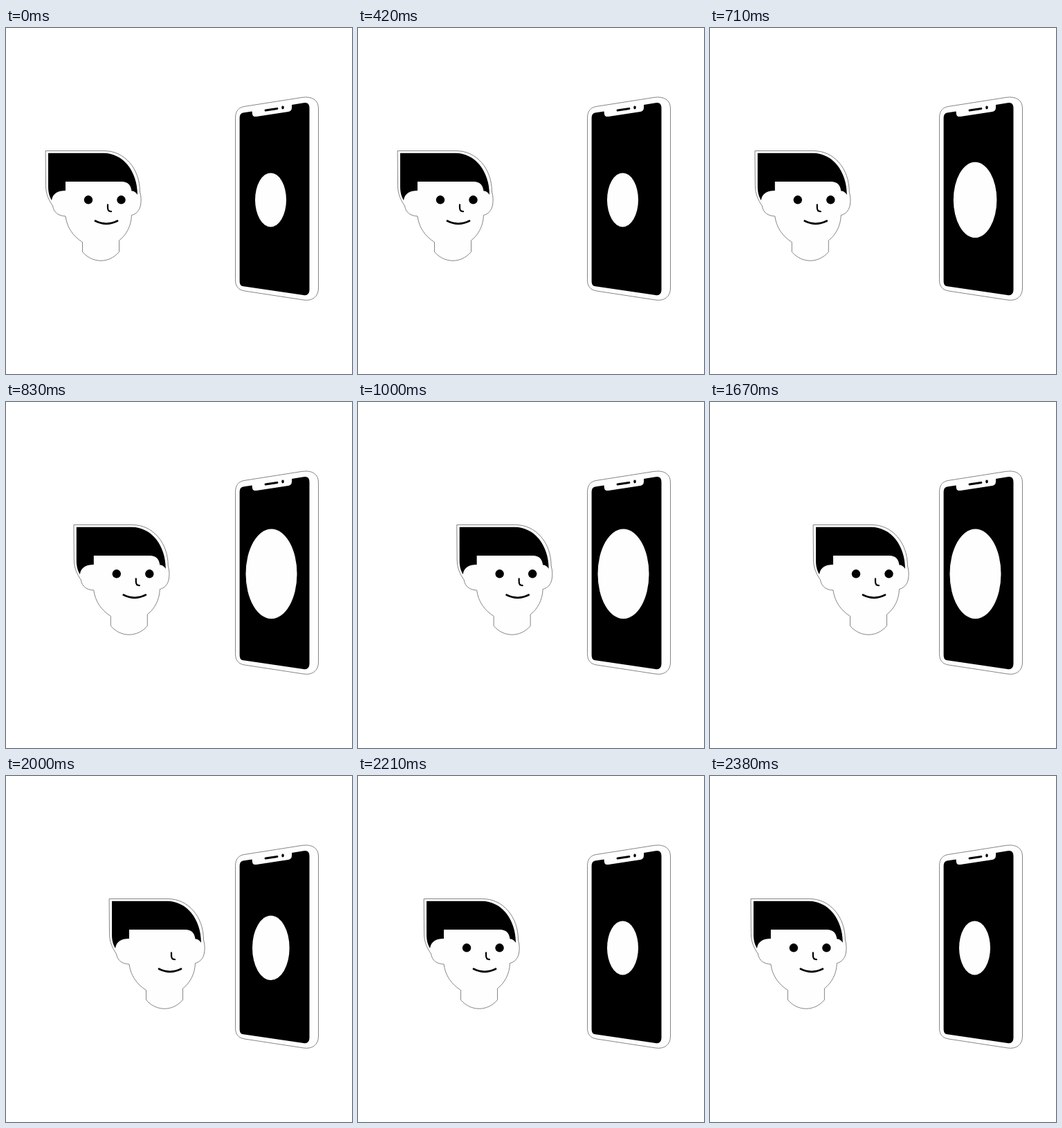
These frames come from a looping animation (500 px wide and 500 px high, 2.43 s). An HTML page with a canvas:

```html
<!DOCTYPE html>
<html lang="en">
<head>
<meta charset="utf-8">
<title>Face scan</title>
<style>
html, body { margin: 0; width: 100%; height: 100%; overflow: hidden; background: #fff; }
canvas { display: block; width: 100vmin; height: 100vmin; }
</style>
</head>
<body>
<canvas id="stage" width="500" height="500"></canvas>
<script>
const ctx = document.getElementById('stage').getContext('2d');
const LOOP = 2430, FPS = 24;
const INK = '#000', EDGE = '#666', PAPER = '#fefefe';

const phoneBody = new Path2D(
  'M331.5 130C331.5 120 336 115 344 113.5L428 100.3C442 98.3 451.5 104 451.5 116' +
  'V376C451.5 388 443 395 430 393L345 380C336 378.5 331.5 374 331.5 364Z');
const screen = new Path2D(
  'M337.6 131C337.6 125 339.5 123 344 122.3L355.5 120.5L356 124.5C356.5 127.5 358.5 128.4 362 128' +
  'L408 121C411.5 120.4 413 118.5 413 115V111L430 108.3C436 107.3 438.5 110 438.5 116' +
  'V378C438.5 384 435 387 430 386L343 373.3C339.5 372.8 337.6 371 337.6 365Z');
const headShape = new Path2D(
  'M57.5 177.5H142C171 177.5 193.5 203 193.5 237C195.5 244 195.5 250 194.5 256' +
  'C193 264 188 269 181.5 270.5C181 286 174 299 163.5 307V323.5' +
  'C149 340.5 125 340.5 110.5 323.5V309.5C97 301 88 288 86 272' +
  'C76 271.5 69 267 67.5 257C62 249 57.5 240 57.5 228Z');
const hair = new Path2D(
  'M61 180.8H141C169 180.8 190 207 190 241C188 237.5 185 235.5 181.5 235.5' +
  'C180.5 227 176 222 167 222H86V235C75 235 67.5 239 66 249C62.5 243 61 237 61 229Z');
const nose = new Path2D('M147 255.3V259.5C147 263.5 149 265.2 152 265.2');
const mouth = new Path2D('M129 278.8Q145 286.8 161 278.8');

const clamp = v => Math.min(1, Math.max(0, v));
const smooth = v => v * v * (3 - 2 * v);
const span = (f, from, to) => clamp((f - from) / (to - from));
const mix = (a, b, p) => a + (b - a) * p;

function outlined(path) {
  ctx.fillStyle = PAPER;
  ctx.fill(path);
  ctx.strokeStyle = EDGE;
  ctx.lineWidth = 0.8;
  ctx.stroke(path);
}

function oval(x, y, rx, ry, color) {
  ctx.fillStyle = color;
  ctx.beginPath();
  ctx.ellipse(x, y, rx, ry, 0, 0, Math.PI * 2);
  ctx.fill();
}

function line(path, width) {
  ctx.strokeStyle = INK;
  ctx.lineWidth = width;
  ctx.stroke(path);
}

function drawPhone(size) {
  outlined(phoneBody);
  ctx.fillStyle = INK;
  ctx.fill(screen);
  line(new Path2D('M375 119L392 116.5'), 2.8);
  oval(400, 115, 1.8, 2.4, INK);
  oval(mix(382.5, 383.5, size), 248.4, mix(22.5, 37, size), mix(39, 64.8, size), PAPER);
}

function drawHead(x, open) {
  ctx.save();
  ctx.translate(x, 0);
  outlined(headShape);
  ctx.fillStyle = INK;
  ctx.fill(hair);
  if (open > 0) {
    oval(119, 248.3, 6.2, 6.2 * open, INK);
    oval(166.5, 248.3, 6.2, 6.2 * open, INK);
  }
  line(nose, 2.2);
  line(mouth, 2.8);
  ctx.restore();
}

// Eye opening around a blink centred on frame c
const blink = (f, c) => clamp((Math.abs(f - c) - 1) / 1.5);

function draw(ms) {
  const f = Math.floor((ms % LOOP + 5) * FPS / 1000);
  const near = smooth(span(f, 15.1, 25.7));
  const back = smooth(Math.pow(span(f, 48, 58), 0.842));
  const grow = smooth(span(f, 13, 20));
  const shrink = smooth(span(f, 45, 49.7));

  ctx.fillStyle = '#fff';
  ctx.fillRect(0, 0, 500, 500);
  ctx.lineCap = 'round';
  drawPhone(grow - shrink);
  drawHead(92 * (near - back), Math.min(blink(f, 33), blink(f, 48)));
}

const start = performance.now();
function tick() {
  draw(performance.now() - start);
  requestAnimationFrame(tick);
}
tick();
</script>
</body>
</html>
```
